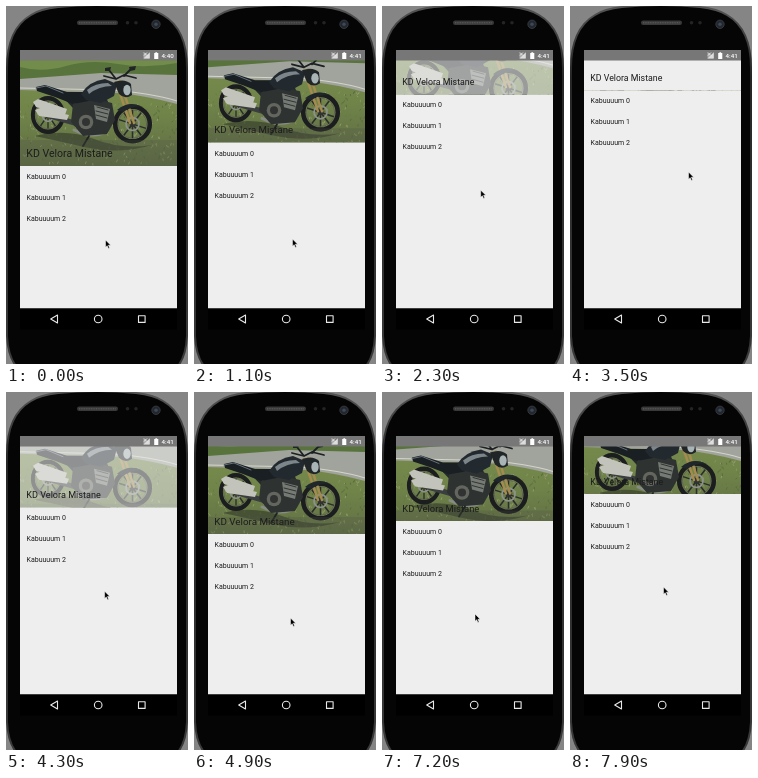
Recreate the animation shown at these times as an HTML page. Size 182 px wide and 358 px high, loop 8 s.

```html
<!DOCTYPE html>
<html lang="en">
<head>
<meta charset="utf-8">
<title>Collapsing header</title>
<style>
html, body { margin: 0; width: 100%; height: 100%; overflow: hidden; background: #858585; }
svg { display: block; width: 100vw; height: 100vh; }
text { font-family: Roboto, "Noto Sans", sans-serif; fill: #1c1c1c; }
.item { font-size: 7px; }
.line { fill: none; stroke-linecap: round; stroke-linejoin: round; }
</style>
</head>
<body>
<svg viewBox="0 0 182 358">
  <defs>
    <linearGradient id="grass" x1="0" y1="0" x2="0" y2="1">
      <stop offset="0" stop-color="#7d9153"/>
      <stop offset=".55" stop-color="#708449"/>
      <stop offset="1" stop-color="#5f6c45"/>
    </linearGradient>
    <linearGradient id="rim" x1="0" y1="0" x2="0" y2="1">
      <stop offset="0" stop-color="#555"/>
      <stop offset=".2" stop-color="#262626"/>
      <stop offset="1" stop-color="#3a3a3a"/>
    </linearGradient>
    <clipPath id="screen"><rect x="14" y="44" width="157" height="258.5"/></clipPath>
    <clipPath id="header"><rect id="headerBox" x="14" y="44" width="157" height="116"/></clipPath>
    <g id="wheel" class="line">
      <circle r="16.8" stroke="#1b1d1e" stroke-width="4.4"/>
      <circle r="13.8" stroke="#5d6157" stroke-width=".8"/>
      <path d="M0-13V13M-12.4-4L12.4 4M-8 10.5L8-10.5M8 10.5L-8-10.5" stroke="#2b2d2c" stroke-width="1.5"/>
      <circle r="6.3" stroke="#8d918c" stroke-width="1.7"/>
      <circle r="2.8" fill="#303333"/>
    </g>
  </defs>

  <!-- phone -->
  <path d="M1 330V62Q1 23 25 9Q34 3 52 1Q91-3 130 1Q148 3 157 9Q181 23 181 62V330Q180 350 172 360H10Q2 350 1 330Z" fill="#050505" stroke="url(#rim)" stroke-width="2"/>
  <rect x="71" y="14.5" width="41" height="4.5" rx="2.2" fill="#393939"/>
  <path d="M73 16.7H110" stroke="#555" stroke-width="1.4" stroke-dasharray="1 .7"/>
  <circle cx="121.5" cy="16.8" r="1.8" fill="#242424"/>
  <circle cx="130" cy="16.8" r="1.8" fill="#242424"/>
  <circle cx="150" cy="18.3" r="4.2" fill="#22262d" stroke="#3b3e43" stroke-width=".8"/>
  <circle cx="150" cy="18.3" r="1.8" fill="#3c4757"/>

  <g clip-path="url(#screen)">
    <rect x="14" y="44" width="157" height="259" fill="#eee"/>

    <g clip-path="url(#header)">
      <g id="photo">
        <rect x="14" y="44" width="157" height="116" fill="url(#grass)"/>
        <path d="M14 44H171V70L95 68L14 74Z" fill="#58733c"/>
        <path d="M14 44H171V57Q140 63 112 58T60 60T14 61Z" fill="#728c4c"/>
        <path d="M14 73L95 67L171 69V98Q142 90 112 87L14 84Z" fill="#a1a49c"/>
        <path d="M14 82L105 84Q145 87 171 95" class="line" stroke="#d4d5c9" stroke-width="1.1"/>
        <g id="blades" class="line" stroke-width=".7"></g>
        <path d="M28 130Q60 122 88 133T146 139Q112 149 78 141T28 130Z" fill="#3c452f" opacity=".75"/>

        <use href="#wheel" transform="translate(42 109) scale(.9 1)"/>
        <use href="#wheel" transform="translate(126.5 118) scale(1.03)"/>
        <g class="line">
          <path d="M44 110L72 118L82 103" stroke="#3b3e3e" stroke-width="5"/>
          <path d="M110 76L124 117M114 75L128 117" stroke="#a58b4e" stroke-width="2.4"/>
          <path d="M58 90L76 109L96 86L106 110" stroke="#25292a" stroke-width="3.4"/>
          <path d="M89 109Q104 115 99 126Q87 133 68 124" stroke="#888b85" stroke-width="3"/>
        </g>
        <path d="M67 98L85 92L106 97L109 114L101 128L77 130L65 116Z" fill="#2e3231"/>
        <circle cx="80" cy="116" r="7.3" fill="#63665e"/>
        <circle cx="80" cy="116" r="4" fill="#303331"/>
        <path d="M88 99L104 103L101 116L90 113Z" fill="#767a74"/>
        <path d="M91 101L102 104M90 105L102 108M90 109L101 112" class="line" stroke="#313432" stroke-width="1"/>
        <path d="M27 96L32 93L61 103L59 109L30 101ZM29 104L34 102L63 109L61 114L33 110Z" fill="#c2c3ba"/>
        <path d="M30 81L39 79L61 86L78 86L83 95L67 98L49 91L31 85Z" fill="#1a1f23"/>
        <path d="M30 82L40 80L57 87" class="line" stroke="#65717a" stroke-width="1"/>
        <path d="M75 88Q83 75 99 73L111 78L108 90L95 97L80 94Z" fill="#22292f"/>
        <path d="M81 84Q89 77 102 77L106 80Q93 80 83 88Z" fill="#7c868a"/>
        <path d="M108 76Q119 72 125 78L126 89Q119 94 113 88Z" fill="#202528"/>
        <ellipse cx="121" cy="84" rx="3.7" ry="5.2" fill="#a9b4b7"/>
        <path d="M98 70L110 73L118 69L130 72M110 73L103 64M118 70L125 63" class="line" stroke="#1c2022" stroke-width="1.8"/>
        <path d="M99 62L105 61L104 65L99 65ZM123 61L130 60L129 64L124 65Z" fill="#202427"/>
        <path d="M111 104Q123 94 137 101Q129 99 117 106Z" fill="#20272b"/>
        <path d="M83 130L77 140" class="line" stroke="#202323" stroke-width="1.8"/>
        <rect x="14" y="134" width="157" height="26" fill="#4c5143" opacity=".25"/>
      </g>
      <rect id="scrim" x="14" y="44" width="157" height="116" fill="#eee"/>
    </g>

    <text id="title" font-size="10.55">KD Velora Mistane</text>
    <g id="list">
      <text class="item" x="20.5" y="173">Kabuuuum 0</text>
      <text class="item" x="20.5" y="194">Kabuuuum 1</text>
      <text class="item" x="20.5" y="215">Kabuuuum 2</text>
    </g>

    <rect x="14" y="44" width="157" height="10.5" fill="#777"/>
    <path d="M137.5 46.5L143.5 52.5H137.5Z" fill="#aaa"/>
    <path d="M143.8 46.2V52.5H137.5Z" fill="#ddd"/>
    <path d="M138 46.5L141 49.5M141 46.5L138 49.5" stroke="#fff" stroke-width=".8"/>
    <path d="M148.2 47H149.4V46.2H151.1V47H152.3V53H148.2Z" fill="#fff"/>
    <text id="clock" x="167.8" y="52" text-anchor="end" font-size="6.2" font-weight="500" style="fill:#fff"></text>
  </g>

  <rect x="14" y="302.5" width="157" height="21" fill="#000"/>
  <g class="line" stroke="#e8e8e8" stroke-width="1.1">
    <path d="M51.5 309V317L44.7 313Z"/>
    <circle cx="92.2" cy="313" r="3.8"/>
    <rect x="132.5" y="309.8" width="6.6" height="6.6"/>
  </g>

  <path id="cursor" d="M0 0V7.2L1.7 5.7L2.9 8.4L4.1 7.9L2.9 5.2H5.2Z" fill="#000" stroke="#fff" stroke-width=".5"/>
</svg>
<script>
const LOOP = 8000, STEP = 100, RANGE = 75.7;
const $ = id => document.getElementById(id);

// keys: [time, value]
const scroll = [[0, 0], [500, 0], [1600, 43], [2400, RANGE], [3600, RANGE], [4900, 18], [5300, 0], [6400, 0], [7200, 31], [7900, 58]];
const fade = [[0, 0], [1940, 0], [2540, 1], [4030, 1], [4630, 0]];
const mouseX = [[0, 99.5], [1600, 98], [2600, 99], [3200, 118.5], [3500, 118.5], [3900, 100], [4900, 96.5], [5700, 94.5], [6300, 94.5], [7200, 93], [7900, 93.5]];
const mouseY = [[0, 234], [500, 257], [1600, 213], [2400, 180], [2700, 168], [3200, 166], [3500, 166], [3600, 168], [4900, 226], [5300, 244], [5700, 258], [6300, 258], [7200, 222], [7900, 195]];

function at(keys, t) {
  const i = keys.findIndex(k => k[0] > t);
  if (i < 0) return keys[keys.length - 1][1];
  const [t0, a] = keys[i - 1], [t1, b] = keys[i];
  return a + (b - a) * (t - t0) / (t1 - t0);
}

function growGrass() {
  let seed = 7;
  const rnd = () => (seed = seed * 16807 % 2147483647) / 2147483647;
  const tones = ["#52663a", "#8b9c61", "#657a43", "#a2a77a"];
  let out = "";
  for (let i = 0; i < 300; i++) {
    const x = 14 + rnd() * 157, y = 98 + rnd() * 62;
    out += `<path d="M${x} ${y}l${rnd() * 2 - 1} ${-1 - rnd()}" stroke="${tones[i % 4]}"/>`;
  }
  $("blades").innerHTML = out;
}

function draw(t) {
  const off = at(scroll, t), left = 1 - off / RANGE;
  const size = 0.835 + 0.165 * left * left;
  $("headerBox").setAttribute("height", 116 - off);
  $("photo").setAttribute("transform", `translate(0 ${-off / 2})`);
  $("scrim").setAttribute("opacity", at(fade, t));
  $("list").setAttribute("transform", `translate(0 ${-off})`);
  $("title").setAttribute("transform", `translate(20.3 ${150.8 - off}) scale(${size})`);
  $("cursor").setAttribute("transform", `translate(${at(mouseX, t)} ${at(mouseY, t)})`);
  $("clock").textContent = t < 800 ? "4:40" : "4:41";
}

const start = performance.now();
function tick() {
  const t = (performance.now() - start) % LOOP;
  draw(Math.floor(t / STEP) * STEP);
  requestAnimationFrame(tick);
}
growGrass();
tick();
</script>
</body>
</html>
```
